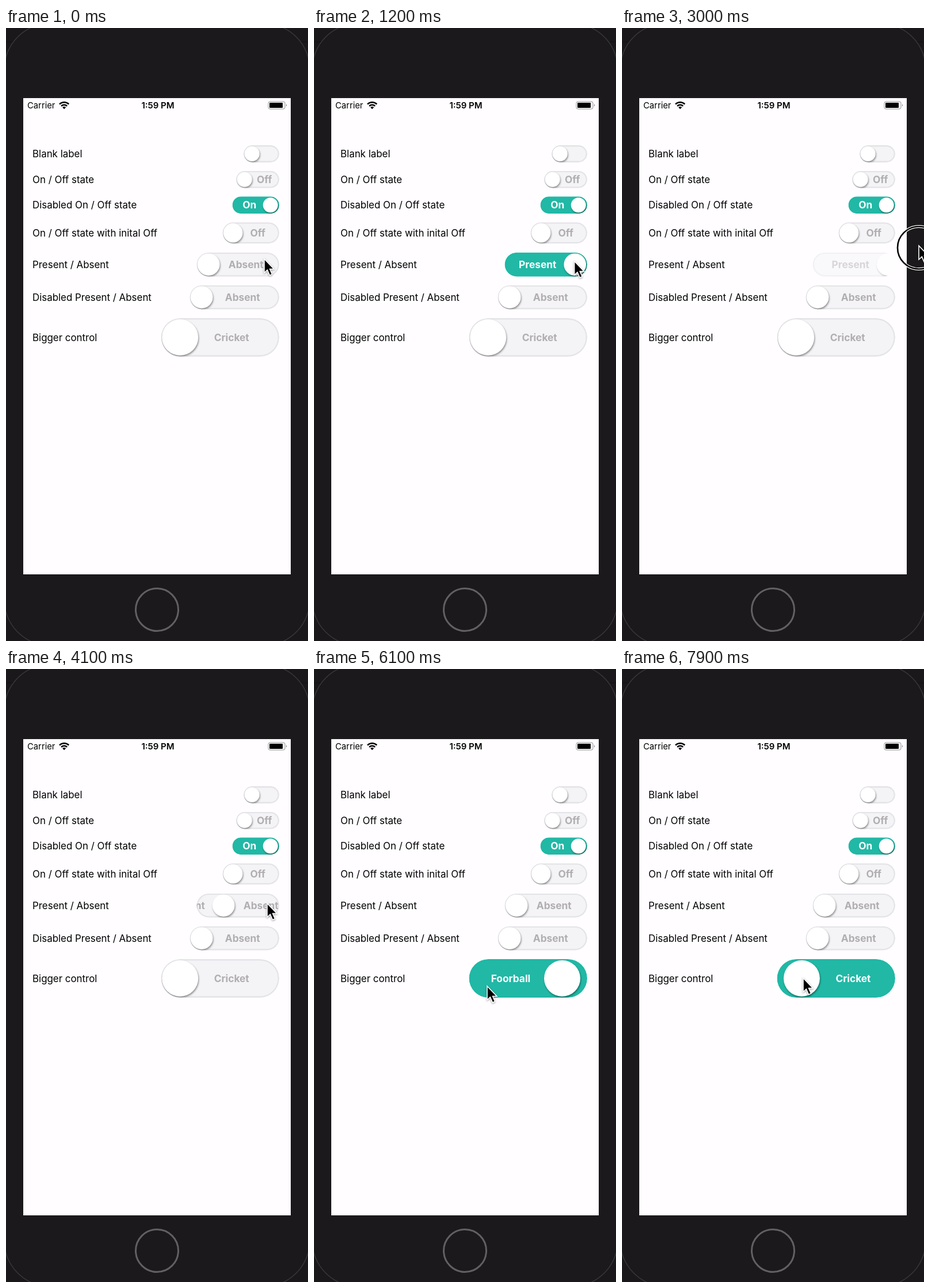
An HTML page that plays this animation: 525 by 1067 pixels, repeating every 8000 ms.

```html
<!DOCTYPE html>
<html lang="en">
<head>
<meta charset="utf-8">
<title>Switch demo</title>
<style>
  html, body { margin: 0; height: 100%; overflow: hidden; background: #1a181b; }
  svg { display: block; width: 100vw; height: 100vh; }
  text { font: 16.9px Inter, "Open Sans", sans-serif; }
  .status { font-size: 14.8px; }
  .clock { font-size: 15px; font-weight: 600; }
  .state { font-size: 17.3px; font-weight: 700; text-anchor: middle; }
  .thumb { fill: #fff; filter: drop-shadow(1.5px 2px 1.5px rgba(0, 0, 0, .42)); }
  #cursor { filter: drop-shadow(0 1.5px 1.5px rgba(0, 0, 0, .4)); }
</style>
</head>
<body>
<svg viewBox="0 0 525 1067">
  <path d="M0 24H14M511 24H525" stroke="#100f11"/>
  <rect x="-3" y="-8" width="531" height="1083" rx="80" fill="#1b191c" stroke="#3b393c" stroke-width="1.3"/>
  <rect x="30" y="122" width="465" height="829" fill="#fffdff"/>
  <circle cx="262.5" cy="1012.5" r="37" fill="none" stroke="#626063" stroke-width="3"/>

  <text class="status" x="37" y="140">Carrier</text>
  <g fill="none" stroke="#000" stroke-width="2.5">
    <path d="M93 132.6a11.6 11.6 0 0 1 16.2 0M96 135.8a7.4 7.4 0 0 1 10.2 0"/>
    <path d="M101.1 141.2l-3-3.1a4.3 4.3 0 0 1 6 0z" fill="#000" stroke="none"/>
  </g>
  <text class="clock" x="264" y="140" text-anchor="middle">1:59 PM</text>
  <rect x="456" y="128" width="29" height="13" rx="3" fill="none" stroke="#929093"/>
  <rect x="458" y="130" width="23" height="9" rx="1"/>
  <path d="M487 132.5q2.4 2 0 4z" fill="#777"/>

  <g id="rows"></g>
  <g id="ring" fill="none">
    <circle r="37" stroke="#fff" stroke-width="5"/>
    <circle r="37" stroke="#000" stroke-width="2.6"/>
  </g>
  <path id="cursor" d="M0 0V24L5.3 19.2L9.4 28.6L13.6 26.8L9.6 17.6H17Z" stroke="#fff" stroke-width="1.6"/>
</svg>
<script>
const LOOP = 8000, STEP = 100, RIGHT = 475;
const $ = id => document.getElementById(id);

// y: centre, x: left edge, h: height, r: thumb radius, gap: thumb to text,
// taps: [time, new state], holds: [from, to] while pressed
const rows = [
  { label: "Blank label", y: 219, x: 413, h: 30, r: 13, gap: 0, off: "", on: "" },
  { label: "On / Off state", y: 263.7, x: 400, h: 30, r: 13, gap: 34.5, off: "Off", on: "On" },
  { label: "Disabled On / Off state", y: 308.2, x: 393.5, h: 30, r: 13, gap: 36.5, off: "Off", on: "On", taps: [[-999, 1]] },
  { label: "On / Off state with inital Off", y: 356.7, x: 376.5, h: 37, r: 16.7, gap: 43, off: "Off", on: "On" },
  { label: "Present / Absent", y: 411.7, x: 331.5, h: 42, r: 19.3, gap: 65, off: "Absent", on: "Present",
    taps: [[400, 1], [1400, 0], [3100, 1], [3920, 0]],
    holds: [[1300, 1400], [1500, 3100], [3800, 3920]],
    drag: [[1500, 0], [1800, -54], [2000, -52], [2600, 0], [2700, 0], [3000, 110], [3200, 103]] },
  { label: "Disabled Present / Absent", y: 468.7, x: 319.5, h: 42, r: 19.3, gap: 71, off: "Absent", on: "Present" },
  { label: "Bigger control", y: 538.5, x: 269.5, h: 67, r: 31.5, gap: 89.5, off: "Cricket", on: "Foorball",
    taps: [[5878, 1], [7100, 0], [7822, 1]],
    holds: [[5800, 5878], [7000, 7100], [7700, 7822]] }
];

const cursorX = [[0, 449], [900, 452], [1400, 453], [1500, 335], [1700, 160], [1800, 171], [2000, 173],
  [2600, 405], [2700, 405], [3000, 516], [3600, 455], [4100, 454], [4400, 432], [4700, 417], [4800, 417],
  [5700, 301], [6600, 301], [7000, 315]];
const cursorY = [[0, 402], [700, 418], [1200, 406], [1400, 407], [1700, 422], [1800, 424], [2700, 418],
  [3000, 379], [3600, 408], [4100, 408], [4400, 486], [4700, 479], [4800, 479],
  [5700, 552], [6600, 552], [7000, 538]];
const rings = [[1300, 1400], [3000, 3100], [3800, 3900], [5800, 5870], [7000, 7100], [7700, 7800]];

const within = (spans, t) => spans.some(([a, b]) => t >= a && t < b);
const ease = u => u < .5 ? 4 * u ** 3 : 1 - 4 * (1 - u) ** 3;

function track(keys, t) {
  const i = keys.findIndex(k => k[0] > t);
  if (i < 0) return keys[keys.length - 1][1];
  const [t0, a] = keys[i - 1], [t1, b] = keys[i];
  return a + (b - a) * (t - t0) / (t1 - t0);
}

function drawRow(row, i, t) {
  const { y, x, h, r, gap, taps = [], holds = [], drag } = row;
  const w = RIGHT - x, top = y - h / 2, travel = w - h;
  const last = taps.filter(tap => tap[0] <= t).pop();
  const on = last ? last[1] : 0;
  let shift = 0;
  if (drag && t >= drag[0][0] && t < 3200) shift = track(drag, t);
  else if (last) {
    const p = ease(Math.min(1, (t - last[0]) / 300));
    shift = travel * (on ? p : 1 - p);
  }
  const cx = x + h / 2 + shift - .3;
  const ink = on ? "#fff" : "#b0aeb1";
  const pill = `x="${x}" y="${top}" width="${w}" height="${h}" rx="${h / 2}"`;
  const inner = `x="${x + 1.2}" y="${top + 1.2}" width="${w - 2.4}" height="${h - 2.4}" rx="${h / 2 - 1.2}"`;
  const word = (s, dx) => `<text class="state" x="${cx + dx}" y="${y + 6.2}" fill="${ink}">${s}</text>`;
  return `<text x="46" y="${y + 6}">${row.label}</text>
    <clipPath id="clip${i}"><rect ${pill}/></clipPath>
    <g opacity="${within(holds, t) ? .5 : 1}" clip-path="url(#clip${i})">
      <rect ${inner} fill="${on ? "#21b8a6" : "#f4f3f6"}" stroke="${on ? "#21b8a6" : "#e4e3e7"}" stroke-width="2.4"/>
      ${word(row.on, -gap)}${word(row.off, gap)}
      <circle class="thumb" cx="${cx}" cy="${y}" r="${r}"/>
    </g>`;
}

function draw(t) {
  $("rows").innerHTML = rows.map((row, i) => drawRow(row, i, t)).join("");
  const x = track(cursorX, t), y = track(cursorY, t);
  $("cursor").setAttribute("transform", `translate(${x} ${y})`);
  $("ring").setAttribute("transform", `translate(${x} ${y + 3.5})`);
  $("ring").setAttribute("visibility", within(rings, t) ? "visible" : "hidden");
}

let start, shown = -1;
function tick(now) {
  start ??= now;
  const t = Math.floor((now - start) % LOOP / STEP) * STEP;
  if (t !== shown) draw(shown = t);
  requestAnimationFrame(tick);
}
draw(0);
requestAnimationFrame(tick);
</script>
</body>
</html>
```
